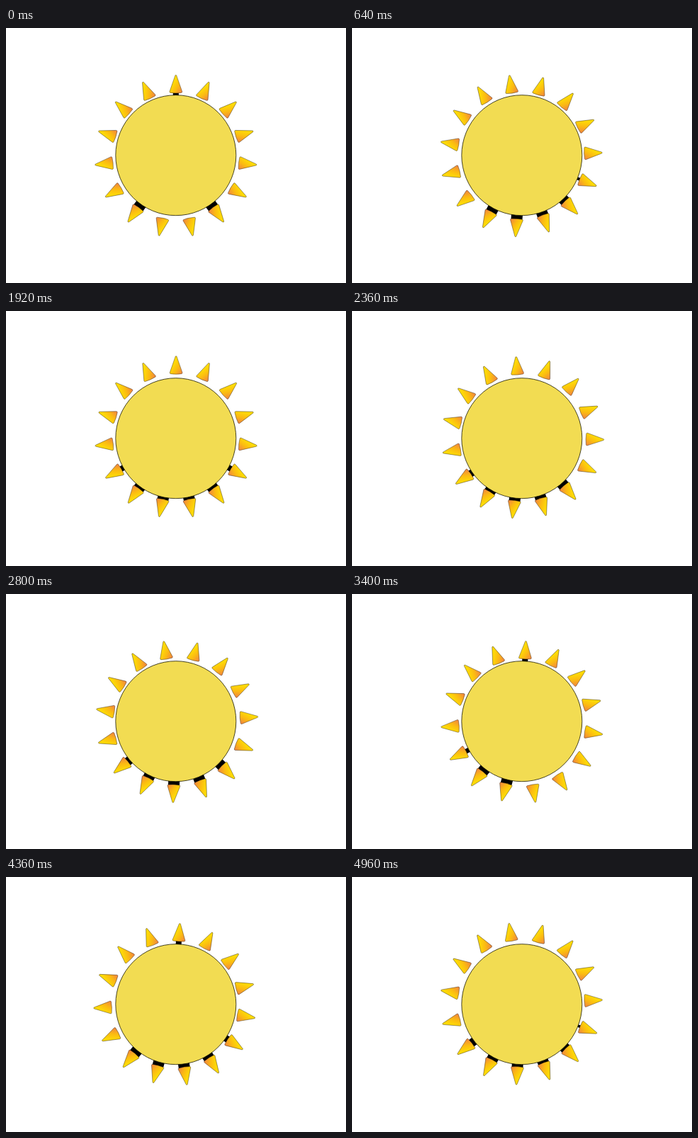
Animation of 480 by 360 pixels, one loop 5 s. Source, as an HTML page with a canvas:

```html
<!DOCTYPE html>
<html lang="en">
<head>
<meta charset="utf-8">
<title>Spinning sun</title>
<style>
  html, body { margin: 0; width: 100%; height: 100%; overflow: hidden; background: #fff; }
  canvas { display: block; }
</style>
</head>
<body>
<canvas id="stage" width="480" height="360"></canvas>
<script>
const ctx = document.getElementById('stage').getContext('2d');
const LOOP = 5000, STEP = 40, RAYS = 15;
const RAD = Math.PI / 180;
const DISC = { x: 239.8, y: 179.7, r: 85 };
const WOBBLE = 1.4;

// Ring rotation: [ms, degrees], linear in between.
const TURN = [[0, 0], [1320, 131.7], [1920, 192], [2800, 278.7],
              [3400, 338.6], [4360, 435.5], [5000, 499.4]];

function turnAt(t) {
  const i = TURN.findIndex(key => key[0] > t);
  const [t0, a0] = TURN[i - 1], [t1, a1] = TURN[i];
  return a0 + (a1 - a0) * (t - t0) / (t1 - t0);
}

const rayFill = ctx.createLinearGradient(-7, -99, 8, -90);
rayFill.addColorStop(0, '#ffdc06');
rayFill.addColorStop(0.5, '#fbba12');
rayFill.addColorStop(1, '#f08540');

const ray = new Path2D(
  'M-0.9 -114.2 Q0 -115.4 0.9 -114.2 L8.8 -91.5 Q9.2 -90 7.8 -89.7 Q0 -88.6 -7.8 -89.7 Q-9.2 -90 -8.8 -91.5 Z');

// Half width of the black gap filler behind a ray; 0 when it is hidden.
function shadeWidth(angle, dx, dy) {
  const down = -Math.cos(angle);
  const gap = dx * Math.sin(angle) + dy * down;
  if (down < -0.99) return gap < 0 ? 4 : 0;
  if (down < 0.34 || gap > Math.min(1.25, 2.5 * down - 0.6)) return 0;
  return Math.min(8, 16 * down - 4);
}

function draw(t) {
  ctx.fillStyle = '#fff';
  ctx.fillRect(0, 0, 480, 360);

  // The ring's middle circles the disc's middle as it turns.
  const swing = (90 + t * 0.1) * RAD;
  const dx = WOBBLE * Math.cos(swing), dy = WOBBLE * Math.sin(swing);
  ctx.lineWidth = 0.6;
  for (let i = 0; i < RAYS; i++) {
    const angle = (turnAt(t) + i * 360 / RAYS) * RAD;
    const half = shadeWidth(angle, dx, dy);
    ctx.save();
    ctx.translate(DISC.x + dx, DISC.y + dy);
    ctx.rotate(angle);
    if (half) {
      ctx.fillStyle = '#000';
      ctx.fillRect(-half, -90, half * 2, 10);
    }
    ctx.fillStyle = rayFill;
    ctx.fill(ray);
    ctx.strokeStyle = 'rgba(30, 20, 0, 0.65)';
    ctx.stroke(ray);
    ctx.restore();
  }

  ctx.beginPath();
  ctx.arc(DISC.x, DISC.y, DISC.r, 0, 2 * Math.PI);
  ctx.fillStyle = '#f2dc52';
  ctx.fill();
  ctx.strokeStyle = '#1a1800';
  ctx.lineWidth = 0.8;
  ctx.stroke();
}

const start = performance.now();
function tick() {
  const t = (performance.now() - start) % LOOP;
  draw(Math.floor(t / STEP) * STEP);
  requestAnimationFrame(tick);
}
tick();
</script>
</body>
</html>
```
